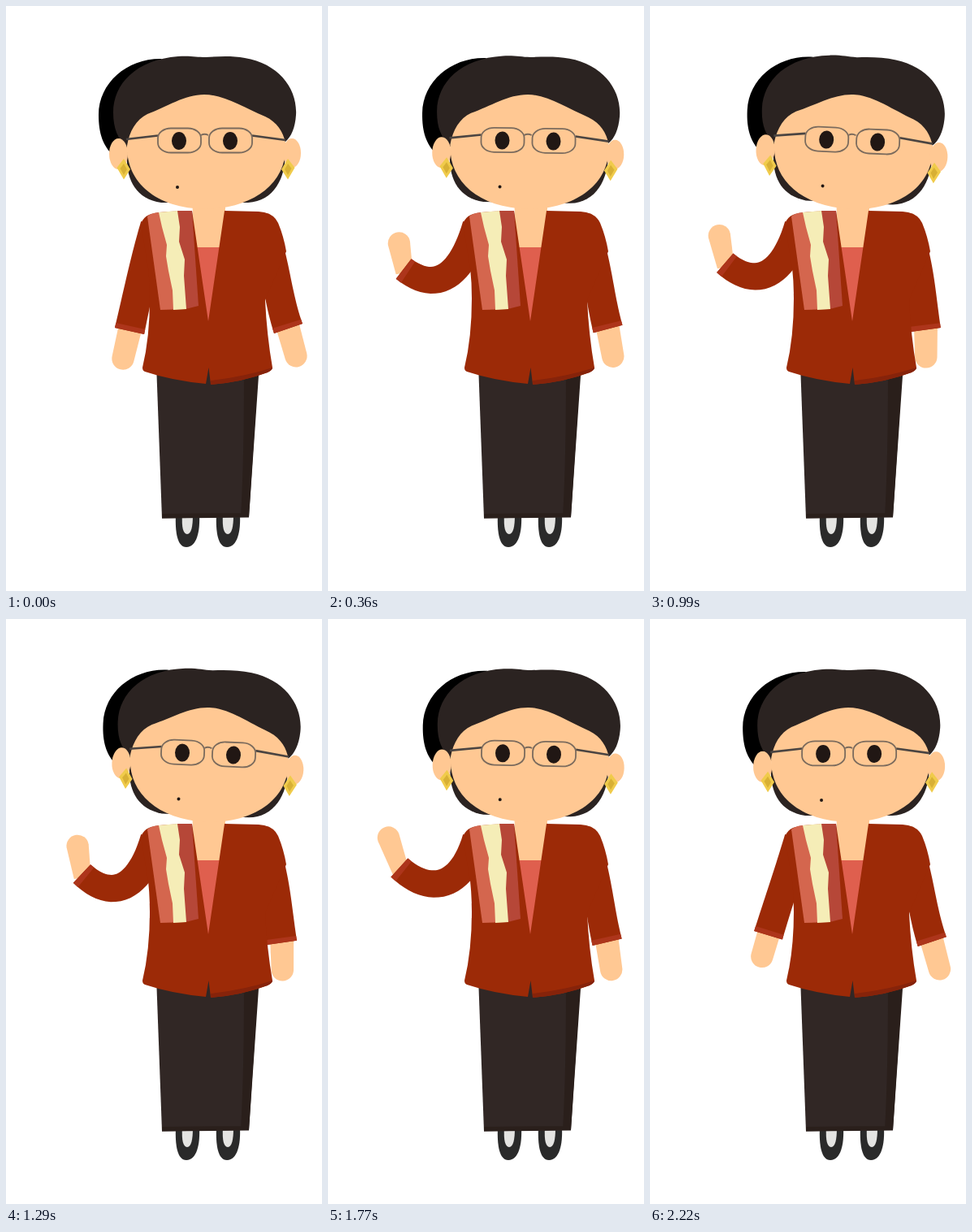
Write an HTML page that moves like this. It is 389x720 px and loops after 2.25 s.

```html
<!DOCTYPE html>
<html lang="en">
<head>
<meta charset="utf-8">
<title>Waving woman</title>
<style>
html, body { margin: 0; width: 100%; height: 100%; overflow: hidden; background: #fff; }
svg { display: block; width: 100vw; height: 100vh; }
.skin { fill: #ffc893; }
.hair { fill: #2b2321; }
.coat { fill: #9c2a07; }
.cuff { fill: #ad351b; }
.gold { fill: #f0cb4b; }
.gold2 { fill: #d8b035; }
</style>
</head>
<body>
<svg viewBox="0 0 389 720">
  <g id="shoe">
    <path fill="#2a2a2a" d="M209 626H238C239 646 235 666 222 666C211 666 208 648 209 626Z"/>
    <path fill="#e4e4e2" d="M217 626H230C230 641 228 650 223 650C218 650 216 641 217 626Z"/>
  </g>
  <use href="#shoe" x="50"/>
  <path fill="#312725" d="M185 440H311L299 629.500L192 630.500Z"/>
  <path fill="#2a1f1b" d="M293 455H311L299 629H289Q293 560 293 455ZM192 625L290 624V629L192 630.500Z"/>

  <g id="left"><path class="skin"/><path class="coat"/><path class="cuff"/></g>
  <g id="right"><path class="skin"/><path class="coat"/><path class="cuff"/></g>

  <path class="skin" d="M229 236H270V300H232Z"/>
  <path fill="#df5f4e" d="M232 297H266L250 392H246Z"/>
  <path class="coat" d="M176 257Q181 255 190 254L229 252L249 388L269 252L311 253Q329 254 335 267Q342 284 345 302L319 362Q321 405 328 445Q328 448 322 451Q290 463 252 466L249.500 445L246 465Q204 461 171 450Q168 449 168 445Q177 408 177 360Q177 340 175 322L166 268Q169 260 176 257Z"/>
  <path fill="#86230a" d="M328 445Q328 448 322 451Q290 463 252 466L252 461Q295 456 328 445Z"/>
  <path fill="#d4664e" d="M174 259Q178 255 188 254L214 252L222 373L190 374Z"/>
  <path fill="#b64738" d="M209 252H229L237 369L221 373Z"/>
  <path fill="#f5edb7" d="M188 254L211 252L214 272L213 290L220 312L219 332L222 373L206 374L205 350L200 326L197 308L198 294L192 272Z"/>

  <g id="head">
    <path d="M192 65C150 64 114 94 114 134C114 158 120 172 131 183L160 170L175 80Z"/>
    <path class="hair" d="M149 180C147 211 158 237 191 242H298C330 240 344 212 344 180Z"/>
    <path class="hair" d="M148 173C138 164 132 151 132 131C132 96 160 66 212 62C228 61 234 63 246 63C262 62 278 61 294 64C336 71 359 102 357 134C356 150 351 161 344 167L250 200Z"/>
    <path class="skin" d="M149 172C152 154 160 140 174 133C198 124 220 109 244 109C268 109 292 125 319 136C334 143 341 155 344 168C348 217 305 249 246 250C183 249 148 216 149 172Z"/>
    <ellipse class="skin" cx="138.500" cy="182" rx="11.500" ry="19"/>
    <ellipse class="skin" cx="352" cy="181" rx="11" ry="18"/>
    <g id="earring">
      <path class="gold" d="M145 188L153 201L145 213.500L136.500 199Z"/>
      <path class="gold2" d="M145 194L149 201L145 208L140.500 200Z"/>
    </g>
    <use href="#earring" x="-492" transform="scale(-1 1)"/>
    <path fill="none" stroke="#4b4542" stroke-width="2.600" d="M148 164L187 159.500M303 159.500L344 165"/>
    <path fill="none" stroke="#7b6b5d" stroke-width="1.800" d="M240 159Q244.500 156.500 249 159"/>
    <g id="eye">
      <rect x="187" y="150.500" width="53" height="30" rx="16" ry="12" fill="none" stroke="#7b6b5d" stroke-width="1.800"/>
      <ellipse cx="213" cy="166" rx="9" ry="11" fill="#211714"/>
    </g>
    <use href="#eye" x="63"/>
    <circle cx="211" cy="223" r="2" fill="#211714"/>
  </g>
</svg>
<script>
const LOOP = 2250, STEP = 30, LIFT = 270, RAD = Math.PI / 180;
const $ = id => document.getElementById(id);
const mix = (a, b, k) => a + (b - a) * k;
const fix = p => p.map(v => v.toFixed(2)).join(' ');
// Triangle wave between 0 and 1
const zigzag = (t, peak, half) => Math.abs((((t - peak) / half) % 2 + 2) % 2 - 1);

// Point and unit normal on a cubic curve
function onCurve(p, t) {
  const u = 1 - t;
  const at = i => u * u * u * p[0][i] + 3 * u * u * t * p[1][i] + 3 * u * t * t * p[2][i] + t * t * t * p[3][i];
  const slope = i => u * u * (p[1][i] - p[0][i]) + 2 * u * t * (p[2][i] - p[1][i]) + t * t * (p[3][i] - p[2][i]);
  const dx = slope(0), dy = slope(1), len = Math.hypot(dx, dy);
  return [at(0), at(1), -dy / len, dx / len];
}

// Band of changing width along a curve, up to its end
function band(p, from, w0, w1) {
  const one = [], two = [], n = 24;
  for (let i = 0; i <= n; i++) {
    const t = mix(from, 1, i / n), [x, y, nx, ny] = onCurve(p, t);
    const r = mix(w0, w1, t * t) / 2;
    one.push(fix([x + nx * r, y + ny * r]));
    two.unshift(fix([x - nx * r, y - ny * r]));
  }
  return 'M' + one.concat(two).join('L') + 'Z';
}

function handPath([cx, cy], [hx, hy], wrist, r) {
  const len = Math.hypot(hx - cx, hy - cy), dx = (hx - cx) / len, dy = (hy - cy) / len;
  const x = cx - dx * 5, y = cy - dy * 5, w = wrist / 2;
  return `M${fix([x - dy * w, y + dx * w])}L${fix([hx - dy * r, hy + dx * r])}` +
    `A${r} ${r} 0 0 0 ${fix([hx + dy * r, hy - dx * r])}L${fix([x + dy * w, y - dx * w])}Z`;
}

// deg: forearm direction, clockwise from straight down; bend: 0 hanging, 1 raised
function drawArm(id, { shoulder, upper, cuff, hand, deg, bend }) {
  const reach = mix(45, 52, bend), width = mix(37, 31, bend);
  const lower = [cuff[0] + Math.sin(deg * RAD) * reach, cuff[1] - Math.cos(deg * RAD) * reach];
  const curve = [shoulder, upper, lower, cuff];
  const [skin, sleeve, trim] = $(id).children;
  skin.setAttribute('d', handPath(cuff, hand, mix(29, 21, bend), 13.7));
  sleeve.setAttribute('d', band(curve, 0, 35, width));
  trim.setAttribute('d', band(curve, 0.955, 35, width));
}

// Lifts, waves out and in while drifting upward, then drops
function leftArm(t) {
  const lift = Math.min(1, t / LIFT, (LOOP - t) / LIFT);
  const out = zigzag(t, 690, 470);
  return {
    shoulder: [183, 270],
    upper: [mix(171, 165, lift), mix(310, 331, lift)],
    cuff: [mix(152, mix(97, 84, out), lift), mix(400, 329 - 5 * out - 0.011 * t, lift)],
    hand: [mix(144, mix(97, 65, out), lift), mix(434, 299.5 - 8 * out - 0.014 * t, lift)],
    deg: mix(12.5, 128 - 9 * out + 0.006 * t, lift ** 1.5),
    bend: lift
  };
}

function rightArm(sway) {
  return {
    shoulder: [315, 270],
    upper: [332, 312],
    cuff: [mix(347.5, 338.4, sway), mix(397, 398.7, sway)],
    hand: [mix(357, 337.5, sway), mix(431, 432, sway)],
    deg: mix(-18.9, -6.2, sway),
    bend: 0
  };
}

function draw(now) {
  const t = Math.floor((now % LOOP) / STEP) * STEP;
  const sway = zigzag(t, LOOP / 2, LOOP / 2);
  $('head').setAttribute('transform', `rotate(${(3 * sway).toFixed(3)} 246 256)`);
  drawArm('left', leftArm(t));
  drawArm('right', rightArm(sway));
}

function tick(now) {
  draw(now);
  requestAnimationFrame(tick);
}
draw(0);
requestAnimationFrame(tick);
</script>
</body>
</html>
```
